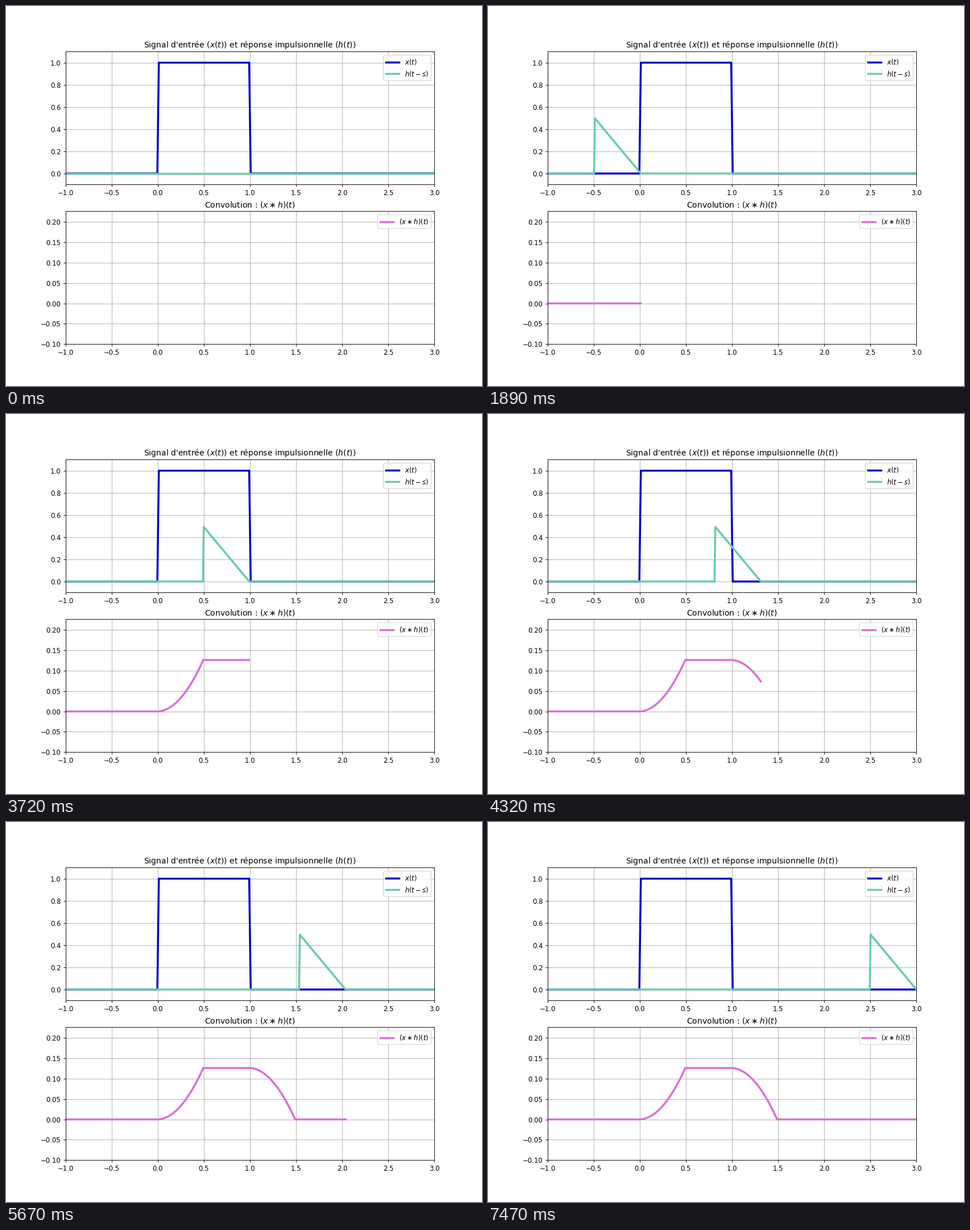
These frames come from a looping animation (837 px wide and 669 px high, 7500 ms). A matplotlib script:

```python
import matplotlib.pyplot as plt
import numpy as np
from matplotlib.animation import FuncAnimation

W, H, DPI = 837, 669, 83.7
FRAMES, INTERVAL = 250, 30


def gate(t):
    return np.where((t >= 0) & (t <= 1), 1.0, 0.0)


def ramp(t):
    return np.where((t >= 0) & (t <= 0.5), t, 0.0)


t = np.linspace(-1, 3, FRAMES)
s = np.linspace(-1, 3, 2 * FRAMES)
dt = t[1] - t[0]
conv = np.convolve(gate(t), ramp(t[t >= 0]))[:FRAMES] * dt

# The tiny margin keeps float rounding from losing a pixel.
fig, (top, bottom) = plt.subplots(
    2, 1, figsize=((W + 1e-6) / DPI, (H + 1e-6) / DPI), dpi=DPI)


def setup(ax, title, ylim):
    ax.set_title(title)
    ax.set_xlim(-1, 3)
    ax.set_ylim(*ylim)
    ax.grid(True)
    ax.legend(loc="upper right")


top.plot(t, gate(t), color="mediumblue", lw=3, label="$x(t)$")
h_line, = top.plot(s, ramp(t[0] - s), color="mediumaquamarine", lw=3,
                   label="$h(t-s)$")
conv_line, = bottom.plot([], [], color="orchid", lw=3,
                         label=r"$(x \ast h)(t)$")

setup(top, "Signal d'entrée ($x(t)$) et réponse impulsionnelle ($h(t)$)",
      (-0.1, 1.1))
setup(bottom, r"Convolution : $(x \ast h)(t)$", (-0.1, conv.max() + 0.1))


def update(i):
    h_line.set_ydata(ramp(t[i] - s))
    conv_line.set_data(t[:i + 1], conv[:i + 1])
    return h_line, conv_line


anim = FuncAnimation(fig, update, frames=FRAMES, interval=INTERVAL,
                     repeat=True, repeat_delay=0, blit=False)
plt.show()
```
